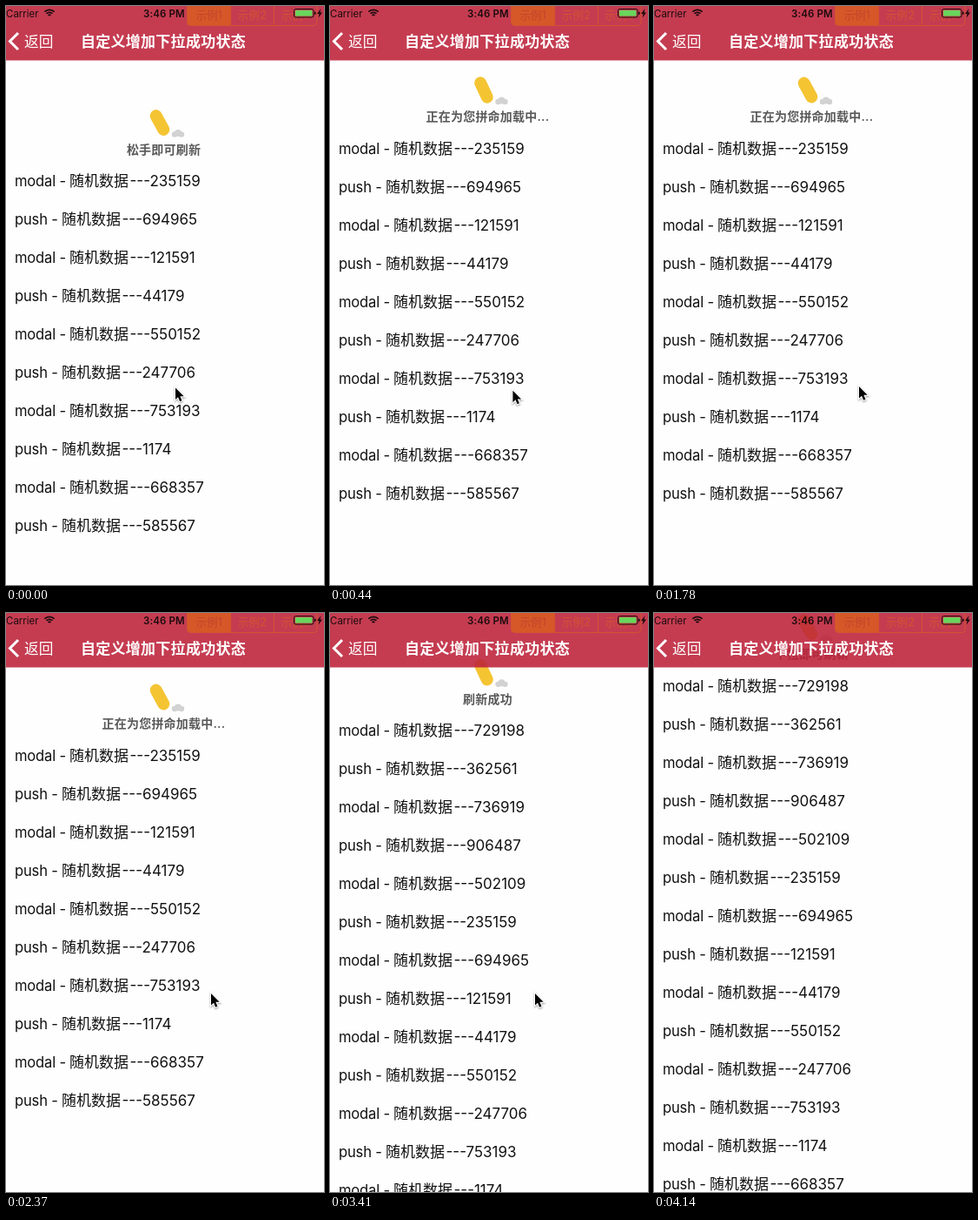
Write an HTML page with a canvas that moves like this. It is 366 px wide and 665 px high and loops after 4.59 s.

```html
<!DOCTYPE html>
<html lang="zh">
<head>
<meta charset="utf-8">
<style>
html, body { margin: 0; overflow: hidden; background: #fefefe; }
canvas { display: block; }
</style>
</head>
<body>
<canvas id="stage" width="366" height="665"></canvas>
<script>
const ctx = document.getElementById('stage').getContext('2d');
const LOOP = 4590, STEP = 148.1, ROW = 44;
const FONT = 'Inter, "Noto Sans CJK SC", "Noto Sans CJK", sans-serif';
const INK = '#1c0b0e', ORANGE = '#d35330';

// Five fresh entries arrive above the ten already listed
const newRows = ('729198 362561 736919 906487 502109 235159 694965 121591 '
  + '44179 550152 247706 753193 1174 668357 585567').split(' ');
const oldRows = newRows.slice(5);

const chevron = new Path2D('M14 31L4.5 40.5L14 50');
const arrow = new Path2D('M0 1V14.5L3 11.7L5.2 16.7L7.5 15.7L5.4 10.8H9.7Z');
const bolt = new Path2D('M362.5 3L358 9H360.5L359.5 13.5L364 7.5H361.5Z');

const progress = (t, start, duration) => Math.min(1, Math.max(0, (t - start) / duration));
const ease = k => k * k * (3 - 2 * k);

function text(str, x, y, size, color, weight = 400, spacing = 0, align = 'left') {
  ctx.font = `${weight} ${size}px ${FONT}`;
  ctx.letterSpacing = spacing + 'px';
  ctx.textAlign = align;
  ctx.fillStyle = color;
  ctx.fillText(str, x, y);
}

function fill(path, color) {
  ctx.fillStyle = color;
  ctx.fill(path);
}

function stroke(path, color, width) {
  ctx.strokeStyle = color;
  ctx.lineWidth = width;
  ctx.stroke(path);
}

function box(x, y, w, h, r = 0) {
  const path = new Path2D();
  path.roundRect(x, y, w, h, r);
  return path;
}

function arc(x, y, r, from = 0, to = 2 * Math.PI) {
  const path = new Path2D();
  path.arc(x, y, r, from, to);
  return path;
}

function refreshHeader(y, label, step) {
  const sway = Math.sin(step * Math.PI / 2);
  ctx.save();
  ctx.translate(177, y - 30);
  ctx.rotate(-0.5 - sway * 0.06);
  fill(box(-7, -16, 14, 32, 7), '#f4c432');
  ctx.restore();
  for (const i of [-1, 0, 1]) {
    fill(arc(198 + 4 * i + sway / 2, y - 18 - i * i * -1.5, 4 - i * i * 0.8), '#d2d2d2');
  }
  text(label, 181.5, y + 5.5, 14, '#5a5a5a', 600, 0.2, 'center');
}

function row(value, i, y) {
  const modal = i % 2 === 0, x = modal ? 73 : 64;
  text(modal ? 'modal -' : 'push -', 10, y + 6, 16.6, '#111', 400, -0.2);
  text('随机数据', x, y + 6, 17, '#111');
  text('---' + value, x + 69.5, y + 6, 17, '#111');
}

function segments() {
  ctx.save();
  ctx.clip(box(208, 0, 151, 23));
  fill(box(208.5, -7, 50.5, 29.5, 4), '#d65828');
  stroke(box(208.5, -7, 149.5, 29.5, 4), ORANGE, 1);
  for (const n of [1, 2, 3]) {
    const x = 159.3 + 49.7 * n;
    if (n > 1) stroke(new Path2D(`M${x} 0V22`), ORANGE, 1);
    text('示例' + n, x + 24.7, 15, 12.7, n === 1 ? '#c0452d' : ORANGE, 400, 0, 'center');
  }
  ctx.restore();
}

function statusBar() {
  text('Carrier', 0, 12.5, 11.5, INK);
  text('3:46 PM', 158, 12.5, 11.5, INK, 600, 0.1);
  for (const r of [2, 5, 8]) stroke(arc(50, 12.3, r, -Math.PI * 0.75, -Math.PI * 0.25), INK, 1.7);
  stroke(box(331.5, 3.5, 22.5, 9.5, 2), INK, 1);
  fill(box(333, 5, 19.5, 6.5, 1), '#68d65c');
  fill(box(355, 6.5, 1.5, 3.5, 1), INK);
  fill(bolt, INK);
}

function navBar() {
  fill(box(0, 0, 366, 62.5), 'rgba(189,34,57,.88)');
  segments();
  statusBar();
  stroke(chevron, '#fff', 3);
  text('返回', 21, 46.5, 16.7, '#fff');
  text('自定义增加下拉成功状态', 86, 46.5, 17, '#fff', 600, 0.27);
}

function cursor(t) {
  const drift = Math.sin(progress(t, 100, 1400) * Math.PI / 2);
  const leave = progress(t, 3700, 300);
  ctx.save();
  ctx.translate(195 + 41 * drift + 36 * leave,
    437.5 - 1.5 * drift + 4 * Math.sin(Math.PI * drift) + 67 * leave);
  ctx.shadowColor = 'rgba(0,0,0,.4)';
  ctx.shadowBlur = 2;
  ctx.shadowOffsetY = 1;
  stroke(arrow, '#fff', 2.2);
  ctx.shadowColor = 'transparent';
  fill(arrow, '#000');
  ctx.restore();
}

function draw(now) {
  // The screen refreshes in even steps
  const step = Math.floor((now % LOOP + 8) / STEP);
  const t = Math.round(step * STEP);
  const done = step >= 17;
  const top = 201 - 37.5 * ease(progress(t, 40, 390)) - 80 * ease(progress(t, 3246, 400));
  const label = step < 1 ? '松手即可刷新' : !done ? '正在为您拼命加载中...'
    : step < 26 ? '刷新成功' : '下拉即可刷新';

  fill(box(0, 0, 366, 665), '#fefefe');
  refreshHeader(top - 37, label, step);
  (done ? newRows : oldRows).forEach((value, i) => row(value, i, top + ROW * i));
  navBar();
  if (step < 28) cursor(t);
}

const start = performance.now();
(function tick() {
  draw(performance.now() - start);
  requestAnimationFrame(tick);
})();
</script>
</body>
</html>
```
